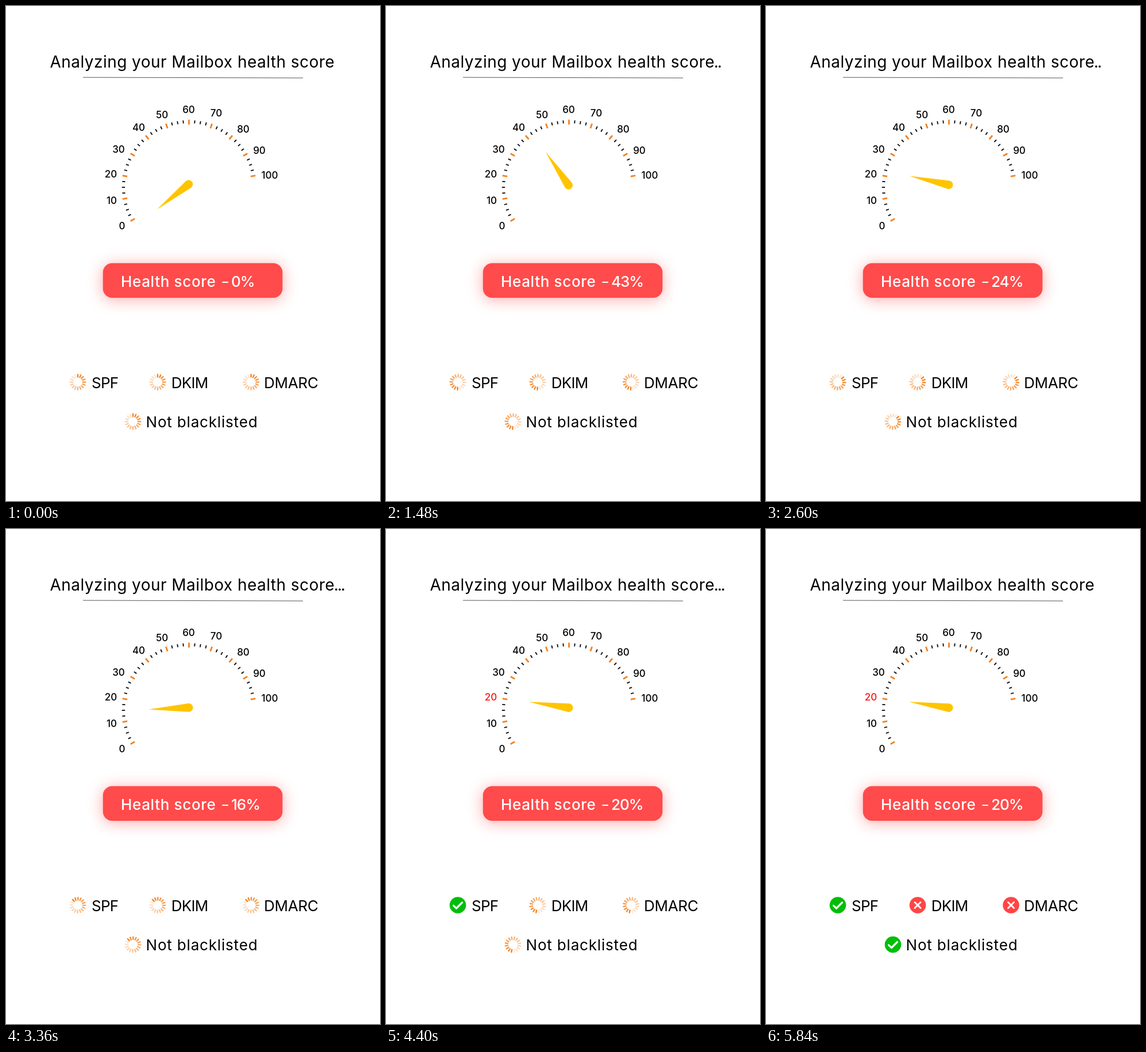
An HTML page with a canvas for the animation above (6000 ms loop, 651 by 860 pixels).

```html
<!DOCTYPE html>
<html lang="en">
<head>
<meta charset="utf-8">
<title>Mailbox health score</title>
<style>
  html, body { margin: 0; width: 100%; height: 100%; overflow: hidden; background: #fff; }
  canvas { display: block; width: 651px; height: 860px; }
</style>
</head>
<body>
<canvas id="stage"></canvas>
<script>
const W = 651, H = 860, LOOP = 6000, STEP = 40, LAST = 5840;
const ORANGE = '#f58220', YELLOW = '#ffc400', RED = '#ff4b4b', GREEN = '#00bd0a';
const canvas = document.getElementById('stage');
const ctx = canvas.getContext('2d');
const ratio = window.devicePixelRatio || 1;
canvas.width = W * ratio;
canvas.height = H * ratio;

const rad = deg => deg * Math.PI / 180;

// Linear interpolation through [input, output] points.
function track(points, x) {
  if (x <= points[0][0]) return points[0][1];
  for (let i = 1; i < points.length; i++) {
    const [x0, y0] = points[i - 1], [x1, y1] = points[i];
    if (x <= x1) return y0 + (y1 - y0) * (x - x0) / (x1 - x0);
  }
  return points[points.length - 1][1];
}

const scoreKeys = [[0, 0], [720, 73], [985, 100], [1480, 43], [1860, 0], [2000, 0],
  [2600, 24], [3000, 40], [3360, 16], [3600, 0], [4000, 20]];
// Needle angle in degrees clockwise from straight up.
const needleScale = [[0, -128.5], [16, -92.6], [20, -81.6], [24, -77.4],
  [43, -34.6], [73, 26.8], [100, 80]];

const gaugeLabels = [[202, 382], [184, 338], [182.5, 292], [196, 248.5], [231, 211],
  [271.5, 189], [318, 180], [366, 186], [413, 214], [441, 250.5], [459, 294]];

const checks = [
  { text: 'SPF', x: 125, y: 653.5, tx: 149, done: 4240, ok: true, gap: -0.8 },
  { text: 'DKIM', x: 264, y: 653.5, tx: 287.7, done: 4720, ok: false, gap: -0.7 },
  { text: 'DMARC', x: 426.5, y: 653.5, tx: 449, done: 5200, ok: false, gap: -0.3 },
  { text: 'Not blacklisted', x: 221, y: 722, tx: 243.5, done: 5680, ok: true, gap: 0.82 }
];

function text(str, x, y, size, { weight = 400, color = '#000', gap = 0, align = 'left' } = {}) {
  ctx.font = `${weight} ${size}px Inter, "Noto Sans", sans-serif`;
  ctx.letterSpacing = gap + 'px';
  ctx.textAlign = align;
  ctx.fillStyle = color;
  ctx.fillText(str, x, y);
}

function line(points, width, color, cap = 'butt') {
  ctx.beginPath();
  points.forEach(([x, y]) => ctx.lineTo(x, y));
  ctx.lineWidth = width;
  ctx.strokeStyle = color;
  ctx.lineCap = cap;
  ctx.lineJoin = cap === 'round' ? 'round' : 'miter';
  ctx.stroke();
}

function at(x, y, angle, draw) {
  ctx.save();
  ctx.translate(x, y);
  ctx.rotate(rad(angle));
  draw();
  ctx.restore();
}

function dotCount(t) {
  const p = t % 980;
  return (p >= 90 && p < 940) + (p >= 185 && p < 750) + (p >= 280 && p < 495);
}

function drawTitle(t) {
  text('Analyzing your Mailbox health score', 76.5, 106.5, 28, { gap: 0.45 });
  for (let i = 0; i < dotCount(t); i++) {
    text('.', 574.8 + 6 * i, 106.5, 28, { align: 'center' });
  }
  line([[134, 124], [517, 125]], 1, '#555');
}

function drawGauge(t, score) {
  for (let a = -120; a <= 80; a += 5) {
    const major = a % 20 === 0;
    at(318.5, 315, a, () => major
      ? line([[0, -117.5], [0, -109]], 2.8, ORANGE)
      : line([[0, -116.7], [0, -111.4]], 1.9, '#111'));
  }
  gaugeLabels.forEach(([x, y], i) => {
    const color = i === 2 && t >= 4000 ? '#ff1515' : '#000';
    text(String(i * 10), x, y + 6.2, 17, { weight: 500, color, align: 'center' });
  });
  at(317, 310.4, track(needleScale, score), () => {
    ctx.beginPath();
    ctx.moveTo(0, -69);
    ctx.lineTo(7.3, 0.7);
    ctx.arc(0, 1.2, 7.3, 0, Math.PI);
    ctx.lineTo(-7.3, 0.7);
    ctx.closePath();
    ctx.fillStyle = YELLOW;
    ctx.fill();
  });
}

function drawBadge(score) {
  ctx.save();
  ctx.shadowColor = 'rgba(255, 75, 75, 0.48)';
  ctx.shadowBlur = 26 * ratio;
  ctx.shadowOffsetY = 3 * ratio;
  ctx.beginPath();
  ctx.roundRect(168.7, 446.8, 312.6, 60.2, 16);
  ctx.fillStyle = RED;
  ctx.fill();
  ctx.restore();
  const style = { weight: 500, color: '#fff' };
  text('Health score', 200, 487.5, 26, { ...style, gap: 0.65 });
  text('\u2212', 381.5, 486, 22, { ...style, align: 'center' });
  text(Math.round(score) + '%', 392, 487.5, 26, { ...style, gap: -1 });
}

function drawSpinner(x, y, t) {
  const spokes = 16;
  for (let i = 0; i < spokes; i++) {
    ctx.globalAlpha = 1 - 0.8 * i / (spokes - 1);
    at(x, y, i * 360 / spokes - t * 0.12, () =>
      line([[0, -13.4], [0, -9]], 2.4, ORANGE, 'round'));
  }
  ctx.globalAlpha = 1;
}

function drawResult(x, y, ok) {
  ctx.beginPath();
  ctx.arc(x, y, 14.3, 0, Math.PI * 2);
  ctx.fillStyle = ok ? GREEN : '#ff4545';
  ctx.fill();
  at(x, y, 0, () => {
    if (ok) {
      line([[-7.5, 0.8], [-2.5, 5.5], [7.5, -4.5]], 3.2, '#fff', 'round');
    } else {
      line([[-5, -5], [5, 5]], 2.9, '#fff', 'round');
      line([[5, -5], [-5, 5]], 2.9, '#fff', 'round');
    }
  });
}

function render(now) {
  const t = Math.min(Math.floor((now % LOOP) / STEP) * STEP, LAST);
  const score = track(scoreKeys, t);
  ctx.setTransform(ratio, 0, 0, ratio, 0, 0);
  ctx.fillStyle = '#fff';
  ctx.fillRect(0, 0, W, H);
  drawTitle(t);
  drawGauge(t, score);
  drawBadge(score);
  for (const c of checks) {
    if (t < c.done) drawSpinner(c.x, c.y, t);
    else drawResult(c.x, c.y, c.ok);
    text(c.text, c.tx, c.y + 10, 26, { gap: c.gap });
  }
}

let start = null;
function tick(now) {
  if (start === null) start = now;
  render(Math.max(0, now - start));
  requestAnimationFrame(tick);
}
render(0);
requestAnimationFrame(tick);
</script>
</body>
</html>
```
